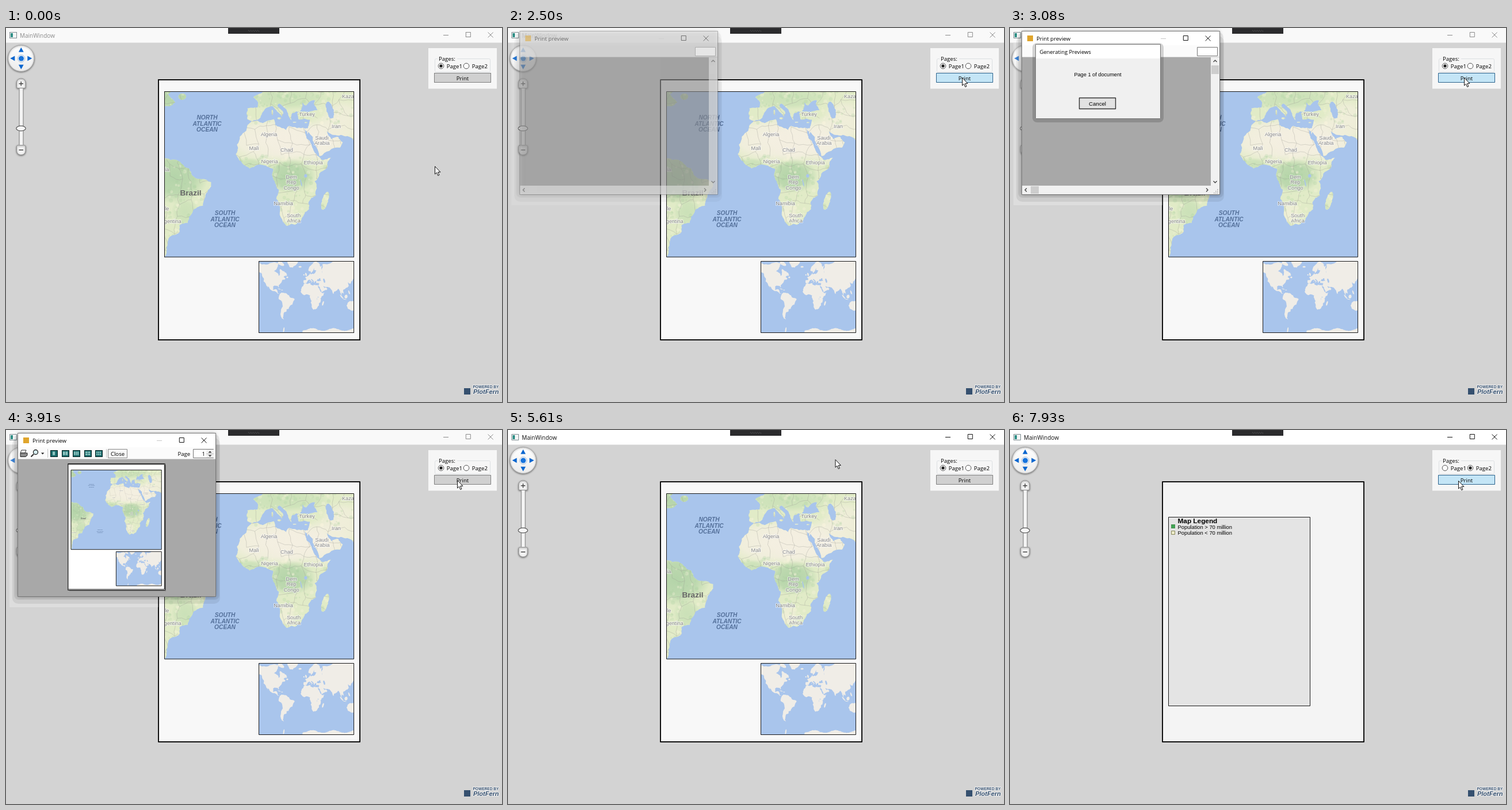
These frames come from a looping animation (862x650 px, 8 s). An HTML page with a canvas:

```html
<!DOCTYPE html>
<html lang="en">
<head>
<meta charset="utf-8">
<title>Print preview</title>
<style>
html, body { margin: 0; width: 100%; height: 100%; overflow: hidden; background: #d3d3d3; }
canvas { display: block; }
</style>
</head>
<body>
<canvas id="stage" width="862" height="650"></canvas>
<script>
const ctx = document.getElementById('stage').getContext('2d');
const LOOP = 8000;
const STEP = 140;
const UI = '"Open Sans", sans-serif';
const SANS = '"Liberation Sans", sans-serif';
const SEA = '#a9c5ec';

// Key points of each coast (lon, lat); finer detail is added by rough()
const coasts = {
  africa: [-6,36, 10,37, 11,33.5, 15,32, 19,30.3, 21,33, 32.5,31.5, 32.6,29.9, 37.2,21, 39.5,15.5, 43.2,12, 44.5,10.4,
    51.2,11.8, 48,4.3, 39.5,-5, 40.5,-15, 35,-20, 35.5,-24, 32.7,-26, 30,-31, 26,-33.8, 19,-34.6, 14.6,-23, 11.8,-17,
    13.8,-11, 9,-1, 9.5,4, 4.5,6.3, -7.5,4.4, -13.2,9, -17.3,14.7, -16.5,21, -9.8,30],
  europe: [-9,43, -9,37, -5.5,36, -1,37, 3.2,42, 9,44.2, 16,38.2, 17,40.3, 12.5,44.5, 14,45.5, 19.5,41.5, 22.8,36.5,
    23.5,40.5, 29,41.2, 30.5,46, 33.5,44.5, 39,47.2, 45,47, 45,67, 40,65, 38,68, 27,71, 14,67.5, 5,60, 11,59, 13,55.5,
    18.5,60, 23,65.7, 22,60.5, 28,60, 21,55, 11,54.5, 9,57, 8,54, 2,51, -4.7,48.4, -1.2,46, -1.8,43.4],
  asia: [44,60, 39,45.5, 41.5,42, 27,40.5, 28,36.8, 36,36.7, 34.5,31.5, 32.5,31.2, 34.2,27.8, 35,29.5, 43,13, 57.8,19,
    59.8,22.5, 56.5,26, 51.5,24.5, 48,30, 57,27, 66.5,25.3, 72.8,19, 77.5,8, 80,15, 91,22.5, 98.5,9, 103.5,1.3,
    100.5,13, 106,9, 106,20, 121,29, 119,38, 126.5,35, 128,40, 140,50, 140,74, 110,76, 68,69, 45,68],
  southAmerica: [-72,12, -62,10.6, -51,4.3, -49,-.5, -35.2,-5.5, -35,-8.5, -39,-14, -41,-22, -48.5,-26, -52,-33,
    -58,-34.5, -58,-38.3, -65,-41, -67,-46, -69,-51, -66,-55, -72,-53, -75,-47, -71.5,-30, -70.3,-18.5, -81,-5, -77.5,8.2],
  northAmerica: [-77.5,8.2, -83,8.3, -94,16.2, -105,20, -113,31, -110,23, -117,32.5, -124,40, -124,47, -140,60,
    -140,69.5, -95,70, -82,69.5, -94,59, -82,55, -79.5,51.3, -77,57, -78,62, -65,59, -56,52.5, -66.5,50, -61,46,
    -70,43.5, -76,35.5, -81,31, -80.5,25.5, -84,30, -97,28, -96,19, -87,21, -84,15, -83.5,10.8]
};
// Islands and lakes: lon, lat, radii in degrees, tilt
const isles = [
  [47, -18.7, 2.3, 6.9, 16], [-2, 54, 2.3, 5, -15], [-8, 53.3, 1.8, 2], [-19, 65, 4.5, 2.2], [-56, 48.8, 2.8, 2.4],
  [-74, 68.5, 10, 5, 30], [-40, 72.5, 15, 24, 12], [-79, 21.8, 4.8, .8, 15], [-71, 19, 2.5, .9], [14, 37.5, 1.4, .7],
  [9, 40.8, .6, 2], [25, 35.2, 1.3, .3], [33.2, 35, 1, .4], [101, 0, 1.8, 7.5, -40], [113.5, .7, 4.5, 5.5, 20],
  [110, -7.3, 5, .8, 8], [122.5, 12.5, 1.8, 6, -20], [133, -25, 18, 14], [-66, -68.5, 2, 7, 10]];
const lakes = [[50.5, 42, 2.6, 6.4, -15], [33, -1, 1.2, 1.3], [29.8, -6, .35, 2.8, -12]];

// Vegetation tints: lon, lat, radii in pixels, rgb
const DESERT = '244,239,225', FOREST = '180,212,169', MEADOW = '203,225,184';
const tints = [
  [8, 24, 92, 42, DESERT], [27, 23, 60, 38, DESERT], [47, 24, 48, 44, DESERT], [60, 36, 42, 40, '240,238,218'],
  [22, -1, 44, 30, FOREST], [-7, 7, 26, 12, MEADOW], [-62, -2, 60, 46, FOREST], [-54, -26, 24, 26, MEADOW],
  [18, 48, 80, 20, MEADOW], [-63, 48, 45, 22, FOREST], [19, -27, 18, 22, '239,239,215']];

const labels = [
  ['Turkey', 523, 150], ['Iran', 574, 171], ['Saudi\nArabia', 549, 195.5], ['Algeria', 457, 185], ['Mali', 431, 209],
  ['Chad', 488, 211.5], ['Nigeria', 458, 232], ['Ethiopia', 534, 234], ['Dem\nRep\nCongo', 496, 268],
  ['Namibia', 482, 305], ['South\nAfrica', 500, 330.5], ['Kazakhstan', 608, 119], ['Argentina', 285, 336],
  ['Chile', 273, 314], ['Colombia', 264, 246]];

// Mercator projection in stage pixels of the large map
const rad = deg => deg * Math.PI / 180;
const lonX = lon => 441.2 + 2.41 * lon;
const latY = lat => 254.5 - 2.41 * Math.asinh(Math.tan(rad(lat))) / rad(1);

let seed = 7;
const rand = () => (seed = (seed * 16807) % 2147483647) / 2147483647;

// Midpoint displacement between two points
function rough([x, y], [u, v], depth = 3) {
  if (!depth) return [[x, y]];
  const k = (rand() - .5) * .28;
  const mid = [(x + u) / 2 + (v - y) * k, (y + v) / 2 - (u - x) * k];
  return [...rough([x, y], mid, depth - 1), ...rough(mid, [u, v], depth - 1)];
}
function addLine(path, pts) {
  pts.forEach(([x, y], i) => i ? path.lineTo(x, y) : path.moveTo(x, y));
}
function addShape(path, corners) {
  const pts = corners.flatMap((p, i) => rough(p, corners[(i + 1) % corners.length]));
  let area = 0;
  pts.forEach(([x, y], i) => {
    const [u, v] = pts[(i + 1) % pts.length];
    area += x * v - u * y;
  });
  addLine(path, area < 0 ? pts.reverse() : pts); // one winding, so overlaps merge
  path.closePath();
}
function coast(list) {
  const pts = [];
  for (let i = 0; i < list.length; i += 2) pts.push([lonX(list[i]), latY(list[i + 1])]);
  return pts;
}
function oval([lon, lat, rx, ry, tilt = 0]) {
  const c = Math.cos(rad(tilt)), s = Math.sin(rad(tilt));
  return Array.from({ length: 10 }, (_, i) => {
    const x = 2.41 * rx * Math.cos(i * Math.PI / 5), y = 2.41 * ry * Math.sin(i * Math.PI / 5);
    return [lonX(lon) + x * c - y * s, latY(lat) + x * s + y * c];
  });
}
function iceShelf() {
  const pts = [-78, 140, -78, -12];
  for (let lon = -12; lon <= 140; lon += 8) pts.push(-68.2 + 1.5 * Math.sin(lon / 10), lon);
  return coast(pts.slice(2).reverse().concat(140, -78));
}
// Country borders: a jittered lattice with gaps
function lattice(gap) {
  const path = new Path2D(), rows = [];
  for (let y = 100; y < 400; y += gap)
    rows.push(Array.from({ length: 18 }, (_, i) => [270 + (i + rand() * .8) * gap, y + rand() * gap * .8]));
  rows.forEach((row, r) => row.forEach((p, i) => {
    for (const q of [row[i + 1], rows[r + 1]?.[i]])
      if (q && rand() < .8) addLine(path, [...rough(p, q, 2), q]);
  }));
  return path;
}
const land = new Path2D(), water = new Path2D();
Object.values(coasts).forEach(c => addShape(land, coast(c)));
isles.forEach(i => addShape(land, oval(i)));
addShape(land, iceShelf());
lakes.forEach(l => addShape(water, oval(l)));
const borders = lattice(22);
const specks = Array.from({ length: 900 }, () => [276 + rand() * 328, 110 + rand() * 260, 1 + rand() * 2.5, rand()])
  .filter(([x, y]) => !(x > 395 && y > 166 && y < 222));

function box(x, y, w, h, fill, line, lw = 1) {
  if (fill) { ctx.fillStyle = fill; ctx.fillRect(x, y, w, h); }
  if (line) { ctx.strokeStyle = line; ctx.lineWidth = lw; ctx.strokeRect(x + .5, y + .5, w - 1, h - 1); }
}
function rounded(x, y, w, h, r, fill, line) {
  ctx.beginPath();
  ctx.roundRect(x, y, w, h, r);
  paint(fill, line);
}
function paint(fill, line, lw = 1) {
  if (fill) { ctx.fillStyle = fill; ctx.fill(); }
  if (line) { ctx.strokeStyle = line; ctx.lineWidth = lw; ctx.stroke(); }
}
function poly(pts, fill, line, lw) {
  ctx.beginPath();
  addLine(ctx, pts);
  ctx.closePath();
  paint(fill, line, lw);
}
function arrow(x, y, dx, dy, w, h, fill) {
  poly([[x + dx * h, y + dy * h], [x - dy * w, y - dx * w], [x + dy * w, y + dx * w]], fill);
}
function disc(x, y, r, fill, line, lw) {
  ctx.beginPath();
  ctx.arc(x, y, r, 0, 7);
  paint(fill, line, lw);
}
function lines(color, lw, ...segs) {
  ctx.beginPath();
  for (const [x, y, u, v] of segs) { ctx.moveTo(x, y); ctx.lineTo(u, v); }
  paint(null, color, lw);
}
function text(str, x, y, font, color = '#000', align = 'left', halo) {
  ctx.font = font;
  ctx.textAlign = align;
  if (halo) {
    ctx.lineJoin = 'round';
    ctx.lineWidth = 2;
    ctx.strokeStyle = halo;
    ctx.strokeText(str, x, y);
  }
  ctx.fillStyle = color;
  ctx.fillText(str, x, y);
}
function mapLabel(str, x, y, style, size, color, scale, halo) {
  ctx.save();
  ctx.translate(x, y);
  ctx.scale(scale, scale);
  const rows = str.split('\n');
  rows.forEach((row, i) =>
    text(row, 0, size * ((i - (rows.length - 1) / 2) * 1.03 + .35), `${style} ${size}px ${SANS}`, color, 'center', halo));
  ctx.restore();
}

function terrain(labelScale) {
  ctx.save();
  ctx.clip(land);
  for (const [lon, lat, rx, ry, rgb] of tints) {
    ctx.save();
    ctx.translate(lonX(lon), latY(lat));
    ctx.scale(rx, ry);
    const g = ctx.createRadialGradient(0, 0, 0, 0, 0, 1);
    g.addColorStop(0, `rgb(${rgb})`);
    g.addColorStop(.6, `rgba(${rgb},.8)`);
    g.addColorStop(1, `rgba(${rgb},0)`);
    disc(0, 0, 1, g);
    ctx.restore();
  }
  for (const [x, y, r, k] of specks) disc(x, y, r, k < .6 ? 'rgba(165,205,155,.22)' : 'rgba(250,246,220,.3)');
  ctx.strokeStyle = 'rgba(150,150,145,.42)';
  ctx.lineWidth = .8;
  ctx.stroke(borders);
  ctx.restore();
  ctx.fillStyle = SEA;
  ctx.fill(water);
  for (const [s, x, y] of labels) mapLabel(s, x, y, '', 9.2, '#858585', labelScale, 'rgba(255,255,255,.6)');
  mapLabel('Brazil', 321, 286, 'bold', 13.6, '#666', labelScale);
  mapLabel('NORTH\nATLANTIC\nOCEAN', 349.5, 166, 'italic bold', 10.2, '#54709a', labelScale);
  mapLabel('SOUTH\nATLANTIC\nOCEAN', 380.5, 332, 'italic bold', 10.2, '#54709a', labelScale);
}
function map(x, y, w, h, lw, inset, labelScale) {
  ctx.save();
  ctx.beginPath();
  ctx.rect(x, y, w, h);
  ctx.clip();
  box(x, y, w, h, SEA);
  if (inset) { ctx.translate(412.25, 403.5); ctx.scale(.25, .25); }
  ctx.fillStyle = inset ? '#f0ede7' : '#e1ebc7';
  ctx.fill(land);
  if (inset) { ctx.fillStyle = SEA; ctx.fill(water); } else terrain(labelScale);
  ctx.restore();
  box(x, y, w, h, null, '#1a1a1a', lw);
}
function sheet(fill, lw) {
  box(264.5, 89.5, 351, 453, fill, '#111', lw);
}
function mapPage(fill, outer, inner, labelScale) {
  sheet(fill, outer);
  map(275, 110, 330, 288.5, inner, false, labelScale);
  map(439, 405, 166, 125, inner, true);
}
function legendPage() {
  sheet('#f4f4f4', 2);
  box(275, 151, 247, 329, '#e4e4e4', '#1a1a1a');
  text('Map Legend', 291.5, 162, 'bold 11.8px ' + SANS);
  ['>', '<'].forEach((sign, i) => text(`Population ${sign} 70 million`, 291.5, 171.5 + i * 10.5, '9.37px ' + SANS));
  box(280, 164, 7, 7, '#3da553', '#4f8f55');
  box(280, 175, 7, 7, '#ecebc8', '#86865c');
}

function cross(x, y, color) {
  lines(color, 1, [x, y - 4.5, x + 9, y + 4.5], [x + 9, y - 4.5, x, y + 4.5]);
}
function windowButtons(x, gap, y, color, minColor = color) {
  lines(minColor, 1, [x, y + .5, x + 9, y + .5]);
  ctx.strokeStyle = color;
  ctx.strokeRect(x + gap + .5, y - 4.5, 8, 8);
  cross(x + 2 * gap, y, color);
}
function titleBar(active) {
  const ink = active ? '#111' : '#8a8a8a';
  box(0, 0, 862, 25.5, active ? '#fff' : '#f9f9f9');
  box(6, 7, 13, 11, '#f4f6f6', '#7d8c90');
  box(8, 9, 4, 7, '#2f8f86');
  text('MainWindow', 24, 16.5, '10px ' + UI, ink);
  windowButtons(760, 38.8, 12, ink);
  box(386, 0, 89, 10, '#2b2b2d');
  for (let x = 421; x < 440; x += 2) box(x, 3 + x % 4 / 2, 1, 2, '#4c4c4f');
}

function navigator() {
  ctx.save();
  ctx.shadowColor = 'rgba(0,0,0,.45)';
  ctx.shadowBlur = 3;
  ctx.shadowOffsetY = 1;
  const g = ctx.createLinearGradient(0, 30, 0, 76);
  g.addColorStop(0, '#fff');
  g.addColorStop(1, '#ececec');
  disc(26.3, 52.8, 22.8, g, '#a5a5a5');
  rounded(18.5, 88, 15.5, 16.5, [7, 7, 2, 2], '#f3f3f3', '#8f8f8f');
  rounded(18.5, 204, 15.5, 16.5, [2, 2, 7, 7], '#f3f3f3', '#8f8f8f');
  ctx.restore();
  for (const [dx, dy] of [[0, -1], [0, 1], [-1, 0], [1, 0]])
    arrow(26.3 + dx * 11, 52.8 + dy * 11, dx, dy, 4.4, 8, '#0b66cf');
  disc(26.5, 53, 6.2, '#fff', '#9db8d6');
  disc(26.5, 53, 4.6, '#1673dc');
  box(22.5, 105, 8, 98, '#f4f4f4');
  lines('#6d6d6d', 1, [23, 105, 23, 203], [30, 105, 30, 203]);
  lines('#444', 1.4, [22.5, 96.7, 30, 96.7], [26.2, 93, 26.2, 100.4], [22.5, 212, 30, 212]);
  ctx.beginPath();
  ctx.ellipse(26, 174.5, 8.2, 4.3, 0, 0, 7);
  paint('#f7f7f7', '#555', 1.2);
}

function radio(x, label, checked, hover) {
  disc(x, 66, 4.8, hover ? '#eaf5ff' : '#fff', hover ? '#5593cf' : '#555');
  if (checked) disc(x, 66, 2.7, '#222');
  text(label, x + 9.7, 70, '9.6px ' + UI);
}
const buttonLooks = {
  rest: ['#d0d0d0', '#808080'], lit: ['#dedede', '#777'],
  hover: ['#bee6fd', '#3c7fb1'], pressed: ['#c4e5f6', '#2c628b']
};
function panel(page, radioHover, button) {
  box(734, 35, 119, 70.5, '#f6f6f6');
  rounded(745.5, 53.5, 96, 23, 2, null, '#dcdfe2');
  box(750, 48, 34, 10, '#f6f6f6');
  text('Pages:', 752, 57.3, '9.6px ' + UI);
  radio(756, 'Page1', page === 1, false);
  radio(800, 'Page2', page === 2, radioHover);
  box(744, 78, 99, 17, ...buttonLooks[button]);
  text('Print', 793.5, 90.5, '9.6px ' + UI, '#000', 'center');
}
function credit() {
  box(796, 626, 11, 11, '#35506f');
  text('POWERED BY', 856.5, 625.5, 'bold 6.6px ' + SANS, '#35506f', 'right', 'rgba(255,255,255,.7)');
  text('PlotFern', 856.5, 636, 'italic bold 11px ' + SANS, '#35506f', 'right', 'rgba(255,255,255,.7)');
}

function toolbar() {
  box(21, 30, 343, 20.5, '#fbfbfb');
  poly([[27, 35], [35, 35], [33, 40], [25, 40]], '#fff', '#333');
  poly([[25, 40], [37, 40], [37, 44], [34, 46.5], [25, 46.5]], '#8c8c8c', '#222');
  lines('#333', 2.2, [48, 42, 43.5, 46.5]);
  disc(51.5, 38.5, 4, '#d9f0f4', '#222', 1.3);
  arrow(63.7, 39.5, 0, 1, 2.7, 3, '#222');
  lines('#c4c4c4', 1, [72.5, 33, 72.5, 48], [174.5, 33, 174.5, 48]);
  [[1, 1], [2, 1], [3, 1], [2, 2], [3, 2]].forEach(([cols, rows], i) => {
    const x = 77 + Math.round(i * 19.6), w = cols === 1 ? 5 : 9 / cols, h = 7 / rows;
    box(x, 35, 13, 12, '#176a6a', '#0d2222');
    for (let c = 0; c < cols; c++) for (let r = 0; r < rows; r++)
      box(x + 6.5 + (c - cols / 2) * w, 37.5 + r * h, w - .8, h - .8, '#8fc4c0');
  });
  box(177, 33, 34, 16, '#f7f7f7', '#8a8a8a');
  text('Close', 194, 44.5, '9.6px ' + UI, '#000', 'center');
  text('Page', 298.5, 44.5, '9.6px ' + UI);
  box(325, 33, 36, 16, '#fff', '#777');
  text('1', 340.5, 45, '9.6px ' + UI);
  box(348, 34, 13, 14, '#f0f0f0');
  arrow(354.5, 39.5, 0, -1, 3, 3, '#333');
  arrow(354.5, 43.5, 0, 1, 3, 3, '#333');
  lines('#bbb', 1, [348, 41.5, 361, 41.5]);
}
function chevron(x, y, dx, dy) {
  ctx.beginPath();
  addLine(ctx, [[x - dx * 3 - dy * 3, y - dy * 3 - dx * 3], [x, y], [x - dx * 3 + dy * 3, y - dy * 3 + dx * 3]]);
  paint(null, '#444', 1.4);
}
function scrollBars() {
  box(21, 30, 343, 20.5, '#fbfbfb');
  box(325, 33, 36, 16, '#fff', '#777');
  box(349, 51, 15, 223, '#f1f1f1');
  box(21, 274, 343, 15, '#f1f1f1');
  box(350, 65, 13, 15, '#cdcdcd');
  box(36, 275, 14, 13, '#cdcdcd');
  chevron(356.5, 56, 0, -1);
  chevron(356.5, 269, 0, 1);
  chevron(26, 281.5, -1, 0);
  chevron(344, 281.5, 1, 0);
  for (let i = 0; i < 3; i++) for (let j = 0; j <= i; j++) box(360 - j * 3, 280 + i * 3, 1.5, 1.5, '#a5a5a5');
}
function progress(alpha) {
  ctx.save();
  ctx.globalAlpha = alpha;
  rounded(39, 26, 228, 138, 8, 'rgba(0,0,0,.16)');
  box(44, 28, 218, 130, '#f0f0f0', '#777');
  box(45, 29, 216, 24, '#fff');
  text('Generating Previews', 51.5, 45, '9.4px ' + UI);
  text('Page 1 of document', 152.5, 83.5, '9.2px ' + SANS, '#000', 'center');
  box(120, 121, 64, 20, '#e2e2e2', '#333', 1.4);
  text('Cancel', 152, 134.5, '9.6px ' + SANS, '#000', 'center');
  ctx.restore();
}
function previewPage() {
  box(110, 61, 168, 219, '#777');
  box(107, 58, 170, 221, '#fff', '#222');
  ctx.save();
  ctx.translate(113, 69.3);
  ctx.scale(.478, .4805);
  ctx.translate(-275.5, -110);
  mapPage('#fff', 2, 2, .5);
  ctx.restore();
}
function preview(t, closeHover) {
  const closing = t >= 5030;
  ctx.save();
  if (t < 2640) ctx.globalAlpha = .5;
  if (!closing) {
    box(6, 26, 259, 282, 'rgba(255,255,255,.22)');
    rounded(11, 14, 361, 288, 10, 'rgba(0,0,0,.07)');
  }
  rounded(14, 8, 357, 287, 8, 'rgba(0,0,0,.07)');
  ctx.shadowColor = 'rgba(0,0,0,.4)';
  ctx.shadowBlur = 6;
  box(21, 6, 343, 283, '#a8a8a8');
  ctx.shadowColor = 'transparent';
  box(21, 6, 343, 24, '#fff');
  box(30, 13, 10, 10, '#e0a52c');
  text('Print preview', 46, 22.3, '9.7px ' + UI, closing ? '#8c8c8c' : '#000');
  if (!closing) {
    windowButtons(262, 38.8, 18, '#111', '#c8c8c8');
    if (closeHover) { box(325, 6, 39, 23, '#e81123'); cross(339.5, 18, '#fff'); }
  }
  if (t < 3350) scrollBars(); else { toolbar(); previewPage(); }
  box(20, 5, 345, 285, null, '#777');
  ctx.restore();
  if (t >= 2640 && t < 3350) progress(Math.min(1, (t - 2500) / 430, (3500 - t) / 280));
}

// Pointer moves: first step, last step, target x, y, sag
const moves = [
  [410, 1390, 800, 71], [1510, 1510, 797, 68], [1650, 1790, 789, 86], [3910, 3910, 784, 87],
  [4030, 4910, 348, 20, 60], [5330, 6000, 789, 82], [6140, 6270, 797, 75], [6540, 6670, 798, 68],
  [7220, 7500, 779, 88]];
function pointerAt(t) {
  let x = 745, y = 240;
  for (const [t0, t1, tx, ty, sag = 0] of moves) {
    if (t < t0) break;
    const last = Math.round((t1 - t0) / STEP);
    const step = last && t < t1 ? Math.floor((t - t0) / (t1 - t0) * last + 1e-6) : last;
    const u = (step + 1) / (last + 1), e = u * u * (3 - 2 * u);
    x += (tx - x) * e;
    y += (ty - y) * e + 4 * sag * e * (1 - e);
  }
  return [x, y];
}
function pointer(x, y) {
  ctx.save();
  ctx.translate(x + .5, y + .5);
  poly([[0, 0], [0, 13.5], [3, 10.7], [5.2, 16], [7.4, 15], [5.2, 9.9], [9.4, 9.9]], '#fff', '#111');
  ctx.restore();
}

const between = (t, a, b) => t >= a && t < b;
function buttonState(t, x, y) {
  if (between(t, 2070, 3350) || t >= 7930) return 'pressed';
  const over = between(x, 744, 843) && between(y, 78, 95);
  if (over && !between(t, 2500, 5330)) return 'hover';
  return between(t, 1390, 2500) || t >= 6140 ? 'lit' : 'rest';
}
function render(t) {
  const [x, y] = pointerAt(t);
  const page = t < 6820 ? 1 : 2;
  box(0, 0, 862, 650, '#d3d3d3');
  titleBar(between(t, 2070, 2500) || t >= 5030);
  if (page === 1) mapPage('#f8f8f8', 2, 1, 1); else legendPage();
  navigator();
  panel(page, Math.hypot(x - 800, y - 66) < 6, buttonState(t, x, y));
  credit();
  if (between(t, 2500, 5330)) preview(t, between(x, 325, 364) && between(y, 6, 29));
  pointer(x, y);
}

let start;
function tick(now) {
  start ??= now;
  render((now - start) % LOOP);
  requestAnimationFrame(tick);
}
requestAnimationFrame(tick);
</script>
</body>
</html>
```
